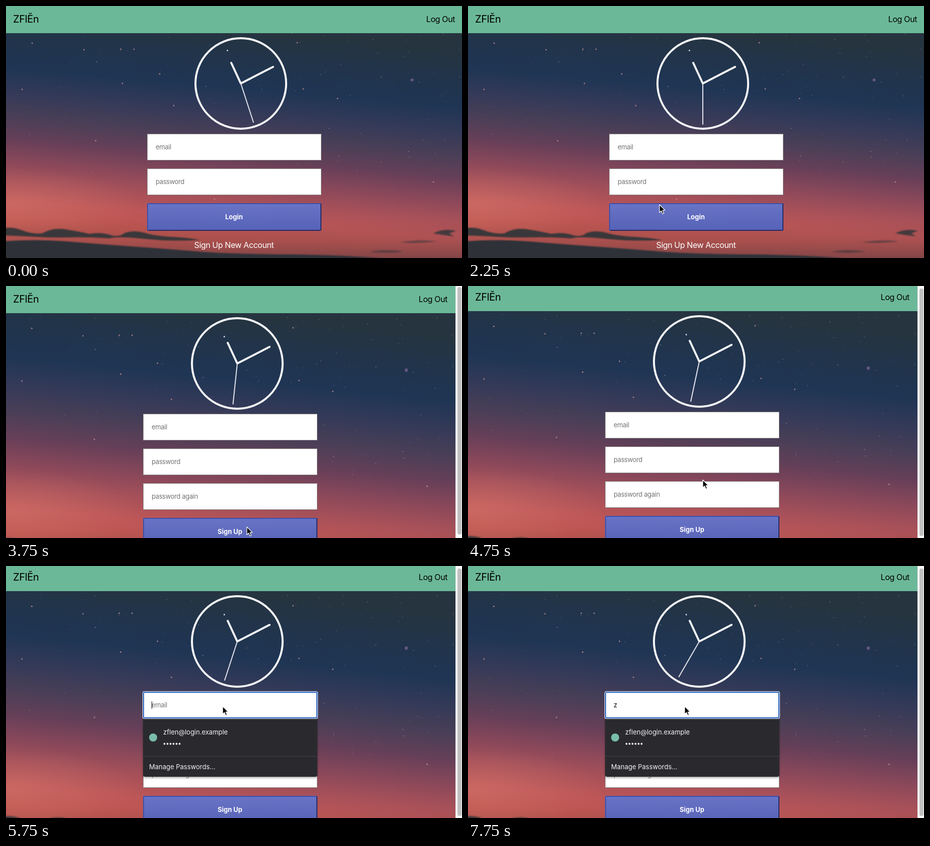
These frames come from a looping animation (905x501 px, 8000 ms). An HTML page:

```html
<!DOCTYPE html>
<html lang="en">
<head>
<meta charset="utf-8">
<title>Login and sign up</title>
<style>
  html, body { margin: 0; width: 100%; height: 100%; overflow: hidden; background: #fafafa; }
  #stage { display: block; width: 905px; height: 501px; }
  text { font: 13px Inter, Roboto, sans-serif; letter-spacing: -.38px; }
  .brand { font-size: 20px; letter-spacing: -.4px; }
  .nav { font-size: 16px; letter-spacing: -.42px; }
  .hint { fill: #757575; }
  .label { font-weight: 700; fill: #fff; letter-spacing: 0; text-anchor: middle; }
  .menu { fill: #f4f4f5; letter-spacing: 0; }
</style>
</head>
<body>
<svg id="stage" viewBox="0 0 905 501">
  <defs>
    <linearGradient id="skyFill" gradientUnits="userSpaceOnUse" x1="452" y1="0" x2="408" y2="501">
      <stop offset=".1" stop-color="#26343f"/>
      <stop offset=".2" stop-color="#21344a"/>
      <stop offset=".32" stop-color="#1f3554"/>
      <stop offset=".42" stop-color="#343a58"/>
      <stop offset=".52" stop-color="#4c3f57"/>
      <stop offset=".6" stop-color="#663f58"/>
      <stop offset=".68" stop-color="#87475a"/>
      <stop offset=".76" stop-color="#a55059"/>
      <stop offset=".84" stop-color="#bd5657"/>
      <stop offset=".92" stop-color="#bd554f"/>
    </linearGradient>
    <linearGradient id="horizon" x1="0" y1="0" x2="0" y2="1">
      <stop offset="0" stop-color="#7a4246" stop-opacity="0"/>
      <stop offset=".5" stop-color="#7a4246" stop-opacity=".25"/>
      <stop offset="1" stop-color="#6a3e44" stop-opacity=".7"/>
    </linearGradient>
    <radialGradient id="glow">
      <stop offset="0" stop-color="#e58d7c" stop-opacity=".32"/>
      <stop offset="1" stop-color="#e58d7c" stop-opacity="0"/>
    </radialGradient>
    <linearGradient id="buttonFill" x1="0" y1="0" x2="0" y2="1">
      <stop offset="0" stop-color="#6974c6"/>
      <stop offset="1" stop-color="#5662b7"/>
    </linearGradient>
    <filter id="soft" x="-20%" y="-50%" width="140%" height="200%"><feGaussianBlur stdDeviation="1.2"/></filter>
    <filter id="shadow"><feDropShadow dx="0" dy="2" stdDeviation="2" flood-opacity=".35"/></filter>
  </defs>

  <g id="page">
    <svg id="sky" viewBox="0 0 905 501" preserveAspectRatio="none">
      <rect width="905" height="501" fill="url(#skyFill)"/>
      <ellipse cx="10" cy="395" rx="260" ry="75" fill="url(#glow)"/>
      <g id="stars"></g>
      <rect y="425" width="905" height="76" fill="url(#horizon)"/>
      <g fill="#2e3338" filter="url(#soft)">
        <path d="M-9 442Q12 438 32 446T72 452Q92 440 118 444T165 453Q188 449 206 455T236 451Q255 445 275 451T330 459T385 465Q330 469 275 463T205 462Q160 459 125 460T60 459T-9 456Z" opacity=".9"/>
        <path d="M-9 468Q60 463 120 468T250 478T380 488T560 494T760 503H-9Z"/>
        <path d="M848 452Q868 441 893 447L880 452L889 458L866 455Z" opacity=".8"/>
        <path d="M782 470Q820 463 855 468Q820 473 782 470ZM722 489Q750 482 790 488Q760 493 722 489Z" opacity=".5"/>
      </g>
    </svg>

    <rect id="header" height="54" fill="#6bb898"/>
    <text class="brand" x="14" y="33">ZFlĔn</text>
    <text class="nav" id="logOut" y="32" text-anchor="end">Log Out</text>

    <g id="clock" fill="none" stroke="#f6f6f9" stroke-linecap="round" stroke-width="4">
      <circle r="90"/>
      <path d="M-19 -41L0 0L64 -33" stroke-linejoin="round"/>
      <path id="secondHand" d="M0 0V-81" stroke-width="2" stroke="#e4e4ec"/>
    </g>

    <g id="login"></g>
    <g id="signup"></g>

    <g id="focus">
      <rect x="271" y="253" width="348" height="55" rx="4" fill="#fff"/>
      <rect x="273" y="255" width="344" height="51" rx="2" fill="#fff" stroke="#1f5bb8" stroke-width="2"/>
      <text class="hint" id="emailHint" x="289" y="285">email</text>
      <text id="typed" x="289" y="285">z</text>
      <rect id="caret" y="273" width="1" height="15"/>
    </g>
    <g id="menu">
      <path d="M272 308H618V419Q618 423 614 423H276Q272 423 272 419Z" fill="#292a2d" filter="url(#shadow)"/>
      <path d="M272 382.5H618" stroke="#404144"/>
      <circle cx="292" cy="345" r="8" fill="#79bda8"/>
      <text class="menu" x="312" y="339">zflen@login.example</text>
      <path d="M314.5 357.5H346" stroke="#f4f4f5" stroke-width="3.8" stroke-linecap="round" stroke-dasharray="0 6"/>
      <text class="menu" x="284" y="408">Manage Passwords…</text>
    </g>
  </g>

  <g id="scrollbar">
    <rect x="892" width="13" height="501" fill="#fafafa"/>
    <path d="M892.5 0V501" stroke="#e8e8e8"/>
    <rect id="thumb" x="896" width="8" height="492" rx="4" fill="#c1c1c1"/>
  </g>
  <path id="cursor" d="M0 0V15.5L3.6 12.2L6.2 18L8.8 16.9L6.3 11.2H11Z" stroke="#fff" stroke-width="1.2" stroke-linejoin="round"/>
</svg>

<script>
const $ = id => document.getElementById(id);
const show = (id, on) => { $(id).style.display = on ? "" : "none"; };
const setAttrs = (id, attrs) => {
  for (const key in attrs) $(id).setAttribute(key, attrs[key]);
};

const field = (x, y, hint) =>
  `<rect x="${x + .5}" y="${y + .5}" width="345" height="52" fill="#fff" stroke="#8a8585"/>
   <text class="hint" x="${x + 17}" y="${y + 31}">${hint}</text>`;

const button = (x, y, label) =>
  `<rect x="${x}" y="${y}" width="346" height="55" rx="3" fill="url(#buttonFill)"/>
   <g fill="none" stroke-width="2">
     <path d="M${x + 1} ${y + 54}V${y + 3}Q${x + 1} ${y + 1} ${x + 3} ${y + 1}H${x + 345}" stroke="#3b50ad"/>
     <path d="M${x + 2} ${y + 54}H${x + 343}Q${x + 345} ${y + 54} ${x + 345} ${y + 52}V${y + 1}" stroke="#232c68"/>
   </g>
   <text class="label" x="${x + 172.5}" y="${y + 32}">${label}</text>`;

$("login").innerHTML = field(280, 254, "email") + field(280, 323, "password") +
  button(280, 392, "Login") +
  `<text class="nav" x="452.5" y="481" fill="#fff" text-anchor="middle">Sign Up New Account</text>`;
$("signup").innerHTML = field(272, 254, "email") + field(272, 323, "password") +
  field(272, 392, "password again") + button(272, 461, "Sign Up");

let seed = 7;
const random = () => (seed = seed * 16807 % 2147483647) / 2147483647;
const star = (x, y, r, color, opacity) =>
  `<circle cx="${x}" cy="${y}" r="${r}" fill="${color}" opacity="${opacity}"/>`;
const brightStars = [[52, 74], [155, 87], [228, 86], [254, 86], [305, 135], [231, 154], [32, 166],
  [333, 198], [178, 268], [590, 165], [658, 184], [578, 73], [848, 350], [414, 384]];
let stars = brightStars.map(([x, y]) => star(x, y, 1.4, "#c08f92", .8)).join("");
for (let i = 0; i < 110; i++) {
  stars += star(random() * 905, 54 + random() ** 1.4 * 290, .5 + random() * .5, "#b9a0a8", .2 + random() * .4);
}
stars += star(806, 147, 3, "#86659a", .7) + star(439.5, 88.5, 1.4, "#d5dcff", 1);
$("stars").innerHTML = stars;

// Pointer stops: time in ms, x, y
const pointerPath = [[500, 262, 355], [1000, 234, 306], [1250, 225, 290], [1500, 225, 290],
  [1750, 245, 305], [2250, 380, 395], [2750, 466, 455], [3000, 476, 472], [3500, 478, 479],
  [4000, 478, 479], [4500, 474, 440], [5000, 458, 331], [5250, 436, 288], [5500, 430, 279]];

function pointerAt(t) {
  const next = pointerPath.findIndex(stop => stop[0] >= t);
  if (next < 1) return pointerPath.at(next).slice(1);
  const [t0, x0, y0] = pointerPath[next - 1];
  const [t1, x1, y1] = pointerPath[next];
  const k = (t - t0) / (t1 - t0);
  return [x0 + (x1 - x0) * k, y0 + (y1 - y0) * k];
}

const LOOP = 8000, STEP = 250;

function draw(t) {
  const signingUp = t >= 3750;
  const focused = t >= 5500;
  const typed = t >= 7250;
  const scrolled = t >= 4500;
  const width = signingUp ? 892 : 905;

  setAttrs("page", { transform: `translate(0 ${scrolled ? -4 : 0})` });
  setAttrs("sky", { width, height: signingUp ? 570 : 501 });
  setAttrs("header", { width });
  setAttrs("logOut", { x: signingUp ? 876 : 891 });
  setAttrs("clock", { transform: `translate(${signingUp ? 459 : 466} 154)` });
  const seconds = 27 + Math.floor((t + 750) / 1000);
  setAttrs("secondHand", { transform: `rotate(${seconds * 6})` });

  show("login", !signingUp);
  show("signup", signingUp);
  show("scrollbar", signingUp);
  setAttrs("thumb", { y: scrolled ? 5 : 2 });

  show("focus", focused);
  show("menu", t >= 5750);
  show("emailHint", !typed);
  show("typed", typed);
  show("caret", t < 6250 || (t >= 6750 && t < 7750));
  setAttrs("caret", { x: typed ? 297 : 289 });

  show("cursor", t >= 500);
  setAttrs("cursor", { transform: `translate(${pointerAt(t).join(" ")})` });
}

const start = performance.now();
function frame() {
  const t = (performance.now() - start) % LOOP;
  draw(Math.floor(t / STEP) * STEP);
  requestAnimationFrame(frame);
}
frame();
</script>
</body>
</html>
```
